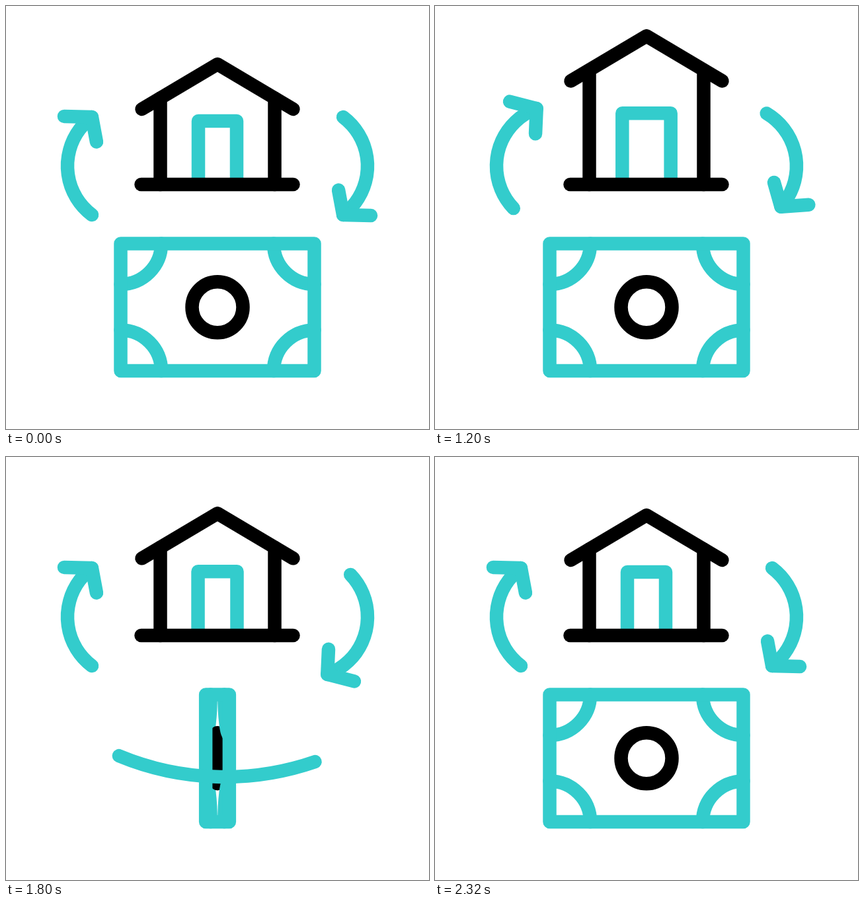
Write an HTML page with a canvas that moves like this. It is 640 px wide and 640 px high and loops after 2400 ms.

```html
<!DOCTYPE html>
<html lang="en">
<head>
<meta charset="utf-8">
<title>House and cash exchange</title>
<style>
  html, body { margin: 0; width: 100%; height: 100%; overflow: hidden; background: #fff; }
  canvas { display: block; width: 640px; height: 640px; }
</style>
</head>
<body>
<canvas id="stage" width="640" height="640"></canvas>
<script>
const ctx = document.getElementById("stage").getContext("2d");
const LOOP = 2400, STEP = 40, TEAL = "#33cccc", BLACK = "#000";
const rad = deg => deg * Math.PI / 180;
const smooth = u => u * u * (3 - 2 * u);
const linear = u => u;

// keys: [time, value] pairs
function track(keys, t, ease = smooth) {
  if (t <= keys[0][0]) return keys[0][1];
  for (let i = 1; i < keys.length; i++) {
    const [t0, v0] = keys[i - 1], [t1, v1] = keys[i];
    if (t < t1) return v0 + (v1 - v0) * ease((t - t0) / (t1 - t0));
  }
  return keys[keys.length - 1][1];
}

const SWING = [[320, 0], [560, -11.3], [640, -11.3], [1000, 16.8], [1200, 16.8], [1440, 0]];
const LIFT = [[800, 0], [1280, 46], [1390, 46], [1870, 0]];
const FLIP = [[1400, 0], [1520, 23.4], [1800, 83], [2080, 136.3], [2320, 180]];
const SWOOSH_HEAD = [[1520, 0], [1880, 1]];
const SWOOSH_TAIL = [[1700, 0], [2080, 1]];
const RIGHT_DELAY = 640;

function stroke(color, build) {
  ctx.strokeStyle = color;
  ctx.beginPath();
  build();
  ctx.stroke();
}

function line(color, ...pts) {
  stroke(color, () => pts.forEach(([x, y]) => ctx.lineTo(x, y)));
}

function arrow(cx, turn, swing) {
  const r = 92.5, tip = rad(233.1 + swing);
  const headTurn = rad(swing * (swing > 0 ? 0.78 : 0.47));
  ctx.save();
  ctx.translate(cx, 242);
  ctx.rotate(turn);
  stroke(TEAL, () => ctx.arc(0, 0, r, rad(126.9 + swing * 0.55), tip));
  ctx.translate(r * Math.cos(tip), r * Math.sin(tip));
  ctx.rotate(headTurn);
  line(TEAL, [-42, -1], [0, 0], [7, 37.5]);
  ctx.restore();
}

function house(lift) {
  const eave = 156 - lift, wallTop = eave - 16.5;
  const doorX = 29 + lift * 0.18, doorY = 174 - lift * 0.277;
  line(TEAL, [320 - doorX, 265], [320 - doorX, doorY], [320 + doorX, doorY], [320 + doorX, 265]);
  line(BLACK, [205.5, eave], [320, eave - 68], [434.5, eave]);
  for (const x of [233.5, 406.5]) line(BLACK, [x, wallTop], [x, 270]);
  line(BLACK, [204.5, 270], [434.5, 270]);
}

function note(scale) {
  const half = 146.5 * scale, top = 359.5, bottom = 552, r = 61.5;
  const corners = side => {
    const x = 320 + side * half;
    const [a, b] = side < 0 ? [0, 90] : [90, 180];
    stroke(TEAL, () => ctx.ellipse(x, top, r * scale, r, 0, rad(a), rad(b)));
    stroke(TEAL, () => ctx.ellipse(x, bottom, r * scale, r, 0, rad(-b), rad(-a)));
  };
  corners(-1);
  stroke(BLACK, () => ctx.ellipse(320, 455.7, 38.5 * scale, 38.5, 0, 0, rad(360)));
  corners(1);
  stroke(TEAL, () => ctx.rect(320 - half, top, half * 2, bottom - top));
}

function swoosh(head, tail) {
  if (head <= 0 || tail >= 1) return;
  const angle = p => rad(60.8 + 59.2 * p);
  stroke(TEAL, () => ctx.arc(331, 66, 418, angle(tail), angle(head)));
}

function draw(t) {
  ctx.fillStyle = "#fff";
  ctx.fillRect(0, 0, 640, 640);
  ctx.lineWidth = 20.5;
  ctx.lineCap = ctx.lineJoin = "round";
  arrow(185.5, 0, track(SWING, t));
  arrow(454.5, Math.PI, track(SWING, t - RIGHT_DELAY));
  house(track(LIFT, t));
  note(Math.abs(Math.cos(rad(track(FLIP, t, linear)))));
  swoosh(track(SWOOSH_HEAD, t), track(SWOOSH_TAIL, t));
}

const start = performance.now();
function tick() {
  const t = (performance.now() - start) % LOOP;
  draw(Math.floor(t / STEP) * STEP);
  requestAnimationFrame(tick);
}
tick();
</script>
</body>
</html>
```
